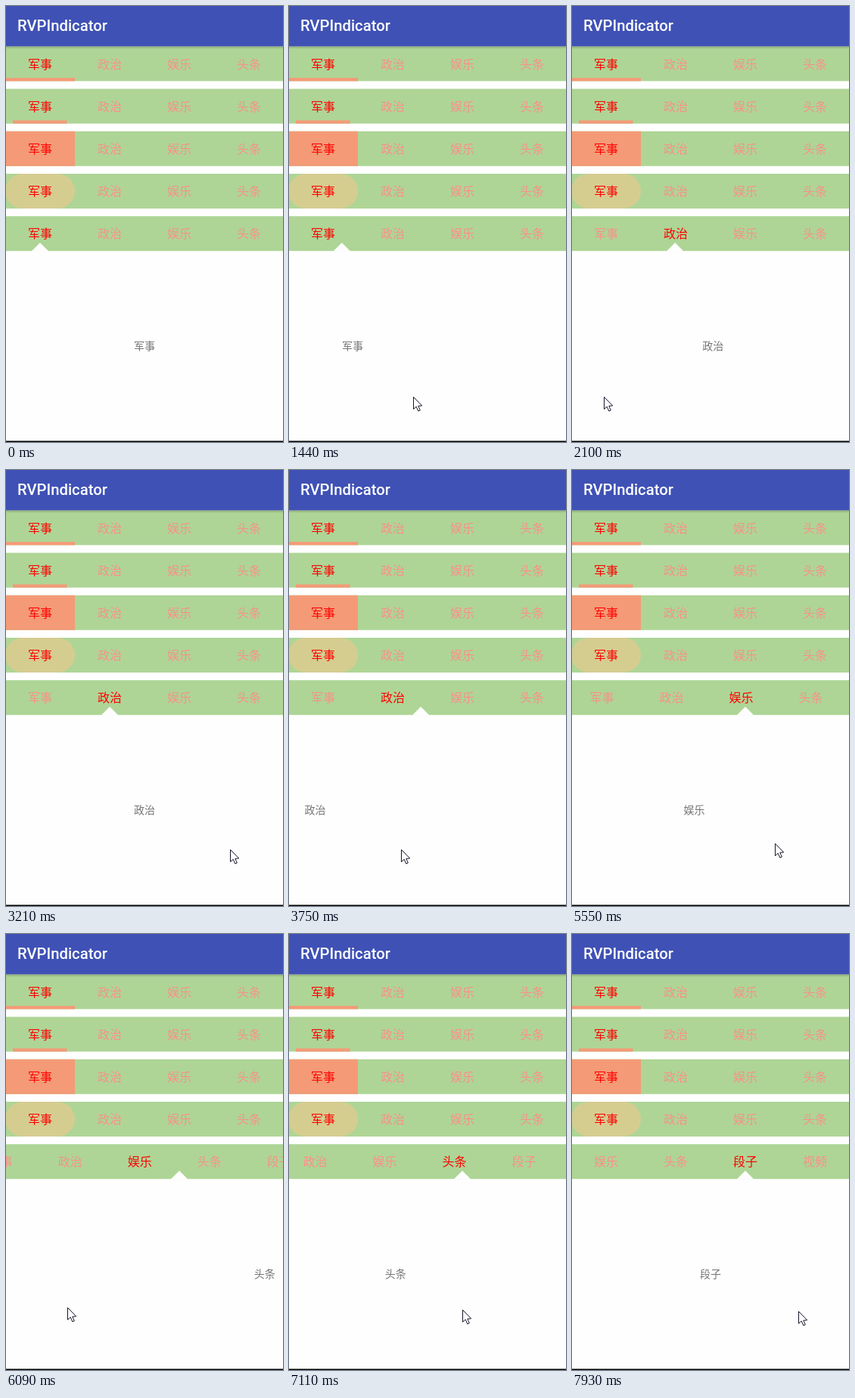
An HTML page with a canvas that plays this animation: 366x577 px, repeating every 8000 ms.

```html
<!DOCTYPE html>
<html lang="zh-CN">
<head>
<meta charset="utf-8">
<style>
  html, body { margin: 0; width: 100%; height: 100%; overflow: hidden; background: #fefefe; }
  canvas { display: block; }
</style>
</head>
<body>
<canvas id="stage" width="366" height="577"></canvas>
<script>
const ctx = document.getElementById('stage').getContext('2d');
const LOOP = 8000, TICK = 141.7, PHASE = 22.5;
const TAB = 92, PAGE = 368, ROW_H = 46, ROW_PITCH = 56.2;
const TRAVEL = .6, SETTLE = 350; // share of a page dragged, then ms to snap into place
const LABELS = ['军事', '政治', '娱乐', '头条', '段子', '视频'];
const ORANGE = '#f49a76', PAPER = '#fefefe';

// Each swipe grabs the page at (x, y), drags it left and lets go
const SWIPES = [
  { start: 1130, release: 1820, x: 263, y: 517 },
  { start: 3310, release: 3900, x: 296, y: 502 },
  { start: 5500, release: 6000, x: 290, y: 494 },
  { start: 7050, release: 7350, x: 271, y: 497 }
];
const ENTRY = { release: 90, x: 289 + TRAVEL * PAGE, y: 522 };
const REST = { start: 7916, x: 299, y: 499 };

const mix = (a, b, u) => a + (b - a) * u;
const progress = (t, from, to) => Math.min(1, Math.max(0, (t - from) / (to - from)));
const easeOut = (u, power) => 1 - (1 - u) ** power;

const snap = t => Math.max(0, Math.floor((t - PHASE) / TICK) * TICK + PHASE);

const dragged = (swipe, t) => TRAVEL * progress(t, swipe.start, swipe.release);

function pageAt(t) {
  return SWIPES.reduce((page, s) => {
    const settle = easeOut(progress(t, s.release, s.release + SETTLE), 5);
    return page + mix(dragged(s, t), 1, settle);
  }, 0);
}

// The pointer follows each drag, waits, then glides to the next grab point
function pointerAt(t) {
  const begun = SWIPES.filter(s => s.start <= t).length;
  const last = SWIPES[begun - 1] || ENTRY, next = SWIPES[begun] || REST;
  const shift = last === ENTRY ? TRAVEL : dragged(last, t);
  const glide = easeOut(progress(t, last.release + SETTLE, next.start - 100), 3);
  return [mix(last.x - shift * PAGE, next.x, glide), mix(last.y, next.y, glide)];
}

const pointerVisible = t => t > 440 && (t < 4100 || t > 4540);

function rect(color, x, y, w, h) {
  ctx.fillStyle = color;
  ctx.fillRect(x, y, w, h);
}

function label(text, x, y, size, color) {
  ctx.font = `${size}px "Noto Sans CJK SC", "Noto Sans CJK", sans-serif`;
  ctx.textAlign = 'center';
  ctx.fillStyle = color;
  ctx.fillText(text, x, y);
}

function polygon(points, color) {
  ctx.beginPath();
  points.forEach(([x, y]) => ctx.lineTo(x, y));
  ctx.closePath();
  ctx.fillStyle = color;
  ctx.fill();
}

function drawHeader() {
  const shadow = ctx.createLinearGradient(0, 53, 0, 57);
  shadow.addColorStop(0, 'rgba(0,0,0,.22)');
  shadow.addColorStop(1, 'rgba(0,0,0,0)');
  rect(shadow, 0, 53, 366, 4);
  rect('#3f51b5', 0, 0, 366, 53.3);
  ctx.font = '500 20.25px Roboto, sans-serif';
  ctx.textAlign = 'left';
  ctx.fillStyle = '#fff';
  ctx.fillText('RVPIndicator', 15, 33);
}

// One indicator style per row: (tab centre, row top, row bottom)
const INDICATORS = [
  (x, top, bottom) => rect(ORANGE, x - 46, bottom - 4.2, TAB, 4.2),
  (x, top, bottom) => rect(ORANGE, x - 36, bottom - 4.2, 71.5, 4.2),
  (x, top) => rect(ORANGE, x - 46, top, TAB, ROW_H),
  (x, top) => {
    ctx.fillStyle = '#d5cd90';
    ctx.beginPath();
    ctx.roundRect(x - 46, top, TAB, ROW_H, ROW_H / 2);
    ctx.fill();
  },
  (x, top, bottom) =>
    polygon([[x - 11.5, bottom + .5], [x, bottom - 11], [x + 11.5, bottom + .5]], PAPER)
];

function drawRow(row, page) {
  const top = 53.4 + ROW_PITCH * row;
  const scroll = Math.max(0, page - 2);
  const selected = Math.floor(page + .41);
  const tabX = i => 45 + TAB * (i - scroll);
  rect('#aed596', 0, top, 366, ROW_H);
  INDICATORS[row](tabX(page), top, top + ROW_H);
  LABELS.forEach((text, i) =>
    label(text, tabX(i), top + 29.2, 16, i === selected ? '#f00' : '#f8918a'));
}

function drawPointer(t) {
  const [x, y] = pointerAt(t);
  ctx.save();
  ctx.translate(Math.round(x) + .5, Math.round(y) + .5);
  polygon([[0, 0], [0, 16], [3.7, 12.7], [6.3, 18.6], [8.8, 17.5], [6.3, 11.8], [11.2, 11.5]], '#fff');
  ctx.strokeStyle = '#15152a';
  ctx.stroke();
  ctx.restore();
}

function draw(now) {
  const t = snap(now % LOOP);
  const page = pageAt(t);
  rect(PAPER, 0, 0, 366, 577);
  INDICATORS.forEach((_, row) => drawRow(row, row === 4 ? page : 0));
  drawHeader();
  LABELS.forEach((text, i) => label(text, 183 + PAGE * (i - page), 455, 14, '#757575'));
  rect('#000', 0, 575.5, 366, 1.5);
  if (pointerVisible(t)) drawPointer(t);
  requestAnimationFrame(draw);
}
requestAnimationFrame(draw);
</script>
</body>
</html>
```
